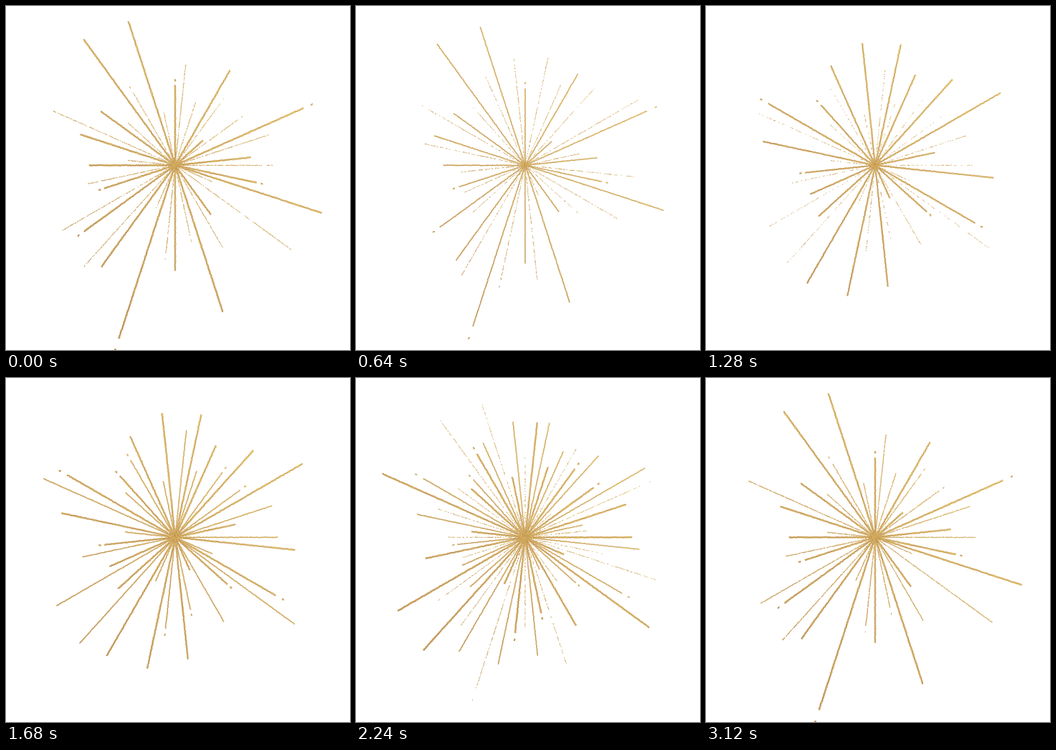
Recreate the animation shown at these times as an HTML page with a canvas. Size 480x480 px, loop 3.2 s.

```html
<!DOCTYPE html>
<html lang="en">
<head>
<meta charset="utf-8">
<title>Gold starburst</title>
<style>
html, body { margin: 0; width: 100%; height: 100%; overflow: hidden; background: #fff; }
canvas { display: block; }
</style>
</head>
<body>
<canvas id="stage" width="480" height="480"></canvas>
<script>
const ctx = document.getElementById('stage').getContext('2d');
const LOOP = 3200, TICK = 80, TAU = 2 * Math.PI;
const CX = 236, CY = 222.3, FULL = 2.4;

// peak: time of full bloom; shrink: share of length lost at rest,
// varied by lean, most strongly towards the clock angle toward
const bursts = {
  A: { peak: 0, shrink: 0.155, lean: 0.045, toward: TAU / 2 },
  B: { peak: 1600, shrink: 0.15, lean: 0.05, toward: 0 },
  C: { peak: 2320, shrink: 0.175, lean: 0.06, toward: TAU * 5 / 6 }
};

// Sixty even directions, clockwise from the top, shared out among the bursts
const order = 'ACBCB' + 'ACB'.repeat(4) + 'AACBCB ' + 'ACB'.repeat(12);

// The outline of the star: one radius per direction
const radii = [
  111, 161, 175, 103, 140, 153, 118, 163, 52, 118, 205, 195, 148, 86, 106,
  149, 168, 115, 215, 59, 162, 214, 98, 0, 85, 142, 50, 215, 108, 171,
  147, 134, 187, 253, 71, 191, 175, 212, 107, 156, 205, 100, 103, 142, 99,
  120, 75, 162, 139, 218, 174, 128, 101, 115, 217, 134, 154, 211, 86, 174
];

const hasDot = n => [0, 6, 9].includes(n % 11);

function noise(a, b) {
  const v = Math.sin(a * 127.1 + b * 311.7) * 43758.5453;
  return v - Math.floor(v);
}

// Foil colour: yellow to the upper right, brown to the lower left, with flecks
function gold(x, y, n) {
  const k = (x - y) / 16 + (n - 0.5) * 44;
  return `rgb(${203 + k * 0.8 | 0},${162 + k | 0},${90 + k * 0.5 | 0})`;
}

function drawRay(n, t) {
  const { peak, shrink, lean, toward } = bursts[order[n]];
  const angle = n / order.length * TAU;
  const level = (1 + Math.cos((t - peak) / LOOP * TAU)) / 2;
  const loss = (shrink + lean * Math.cos(angle - toward)) * (1 - level);
  const length = radii[n] * (1 - loss), gap = radii[n] * 0.07;
  const end = hasDot(n) ? length + gap + 1 : length;
  const width = FULL * level, cover = (width - 0.35) / 0.95;
  const ux = Math.sin(angle), uy = -Math.cos(angle);

  for (let s = 0; s < end; s++) {
    if (s > length && s < length + gap - 2) continue;
    if (noise(n, s) > cover) continue;
    const grain = noise(s, n + 7), side = (noise(s, n + 19) - 0.5) * 0.7;
    const x = CX + ux * s - uy * side, y = CY + uy * s + ux * side;
    ctx.strokeStyle = gold(x, y, grain);
    ctx.lineWidth = Math.max(0.9, width * (0.65 + grain * 0.6));
    ctx.beginPath();
    ctx.moveTo(x, y);
    ctx.lineTo(x + ux * 1.3, y + uy * 1.3);
    ctx.stroke();
  }
}

function draw(t) {
  ctx.clearRect(0, 0, 480, 480);
  for (let n = 0; n < order.length; n++) {
    if (order[n] !== ' ') drawRay(n, t);
  }
}

let shown = -1;
function frame() {
  const t = Math.floor(performance.now() % LOOP / TICK) * TICK;
  if (t !== shown) draw(shown = t);
  requestAnimationFrame(frame);
}
frame();
</script>
</body>
</html>
```
